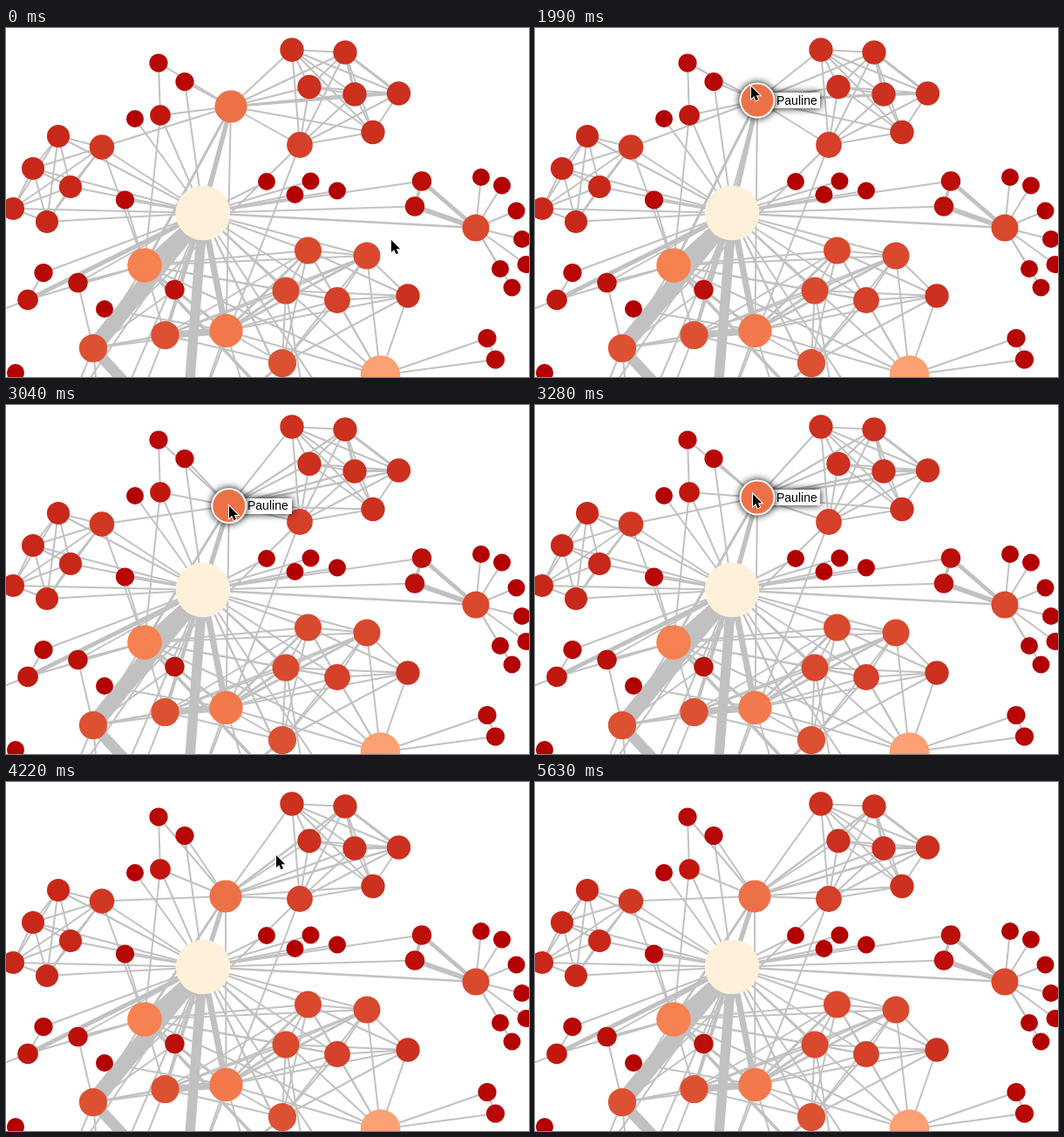
Animation of 600x400 px, one loop 6350 ms. Source, as an HTML page with a canvas:

```html
<!DOCTYPE html>
<html lang="en">
<head>
<meta charset="utf-8">
<title>Network graph</title>
<style>
  html, body { margin: 0; width: 100%; height: 100%; overflow: hidden; background: #fff; }
  canvas { display: block; }
</style>
</head>
<body>
<canvas id="stage" width="600" height="400"></canvas>
<script>
const ctx = document.getElementById('stage').getContext('2d');
const LOOP = 6350, HOVER_START = 1400, HOVER_END = 4220;
const LABEL = 'Pauline', FONT_SIZE = 14;

// Nodes: size and colour follow the degree
const nodes = {}, edges = [];

function mix(a, b, t) {
  return `rgb(${a.map((v, i) => Math.round(v + (b[i] - v) * t))})`;
}

function add(degree, places) {
  const t = (degree - 1) / 17.5;
  const color = t < 1 ? mix([179, 0, 0], [252, 141, 89], t)
                      : mix([252, 141, 89], [254, 240, 217], t - 1);
  for (const [name, [x, y]] of Object.entries(places))
    nodes[name] = { x, y, r: 10 + 0.61 * (degree - 1), color };
}

// Edges: "a b c" lists of node names
function link(center, names, value = 1) {
  for (const name of names.split(' '))
    edges.push([nodes[center], nodes[name], Math.max(2, value * 0.6)]);
}

function clique(names, value) {
  const list = names.split(' ');
  list.slice(0, -1).forEach((name, i) => link(name, list.slice(i + 1).join(' '), value));
}

add(1, {
  leaf1: [299, 176], leaf2: [331.5, 191], leaf3: [349.5, 175.5], leaf4: [380, 186.5],
  leaf5: [148, 104], leaf6: [113, 322], leaf7: [11, 395],
  ray1: [545, 171], ray2: [569, 180.5], ray3: [585.5, 209.5], ray4: [592, 242],
  ray5: [596.5, 271], ray6: [567, 276], ray7: [580.5, 297.5], westOff: [-35, 335]
});
add(2, {
  top: [175, 40], topRight: [205, 61.5], west: [136.5, 197], farWest: [43, 280.5],
  twin1: [552, 355.5], twin2: [561.5, 380]
});
add(3, { east1: [477, 175.5], east2: [469, 204.5], low1: [82.5, 292], low2: [193.5, 300] });
add(4, { topLow: [177, 100], farWest2: [25, 311.5] });
add(6, {
  left1: [60, 124], left2: [31, 161], left3: [74, 182], left4: [47, 222], left5: [8, 207]
});
add(7, {
  up1: [328, 25], up2: [348, 67.5], up3: [421, 119.5],
  up4: [389, 28], up5: [400, 76], up6: [450.5, 75], gang5: [461, 307]
});
add(8, { leftHead: [110, 136.5] });
add(9, { upHead: [337, 134], gang4: [380, 312] });
add(10, { eastHead: [539, 229], gang1: [346.5, 255], gang2: [414, 261], gang3: [321, 301] });
add(11, { cosy: [100, 367], inn: [182.5, 352], girl: [317, 384] });
add(15, { drag: [258, 90] });
add(16, { host: [252.5, 347] });
add(17, { guard: [159, 272] });
add(22, { boy: [429.5, 398] });
add(36, { hub: [226, 212] });
// Below the visible area
add(10, {
  south: [205, 480], southEast: [350, 475], southFar: [410, 490],
  southWest: [110, 480], southWest2: [70, 440], south2: [140, 460], south3: [290, 470]
});

link('hub', 'leaf1 leaf2 leaf3 leaf4 leaf5 west topRight topLow farWest low1 low2 leftHead ' +
  'left1 left2 left3 left4 left5 east1 east2 gang1 gang2 gang3 gang4 boy ' +
  'southFar southWest southWest2');
link('hub', 'eastHead southEast', 4);
link('hub', 'inn', 7);
link('hub', 'farWest2', 8);
link('hub', 'drag', 9);
link('hub', 'host', 12);
link('hub', 'guard', 17);
link('hub', 'south', 19);
link('hub', 'cosy', 31);

link('drag', 'top topRight topLow upHead up1 up2 up3 leftHead inn host');
link('drag', 'up4 up5 up6', 4);
link('drag', 'guard', 5);
link('top', 'topLow');
clique('upHead up1 up2 up3 up4 up5 up6', 3);
clique('up4 up5 up6', 5);
link('upHead', 'cosy south');

clique('leftHead left1 left2 left3 left4 left5', 2);
link('farWest2', 'farWest westOff');
link('guard', 'farWest2 leftHead topLow west low1 low2 cosy inn gang1 gang2 gang3 gang4 boy');
link('guard', 'host', 5);
link('guard', 'southEast', 6);

link('eastHead', 'ray1 ray2 ray3 ray4 ray5 ray6 ray7');
link('eastHead', 'east1', 8);
link('eastHead', 'east2', 10);
link('east1', 'east2', 6);

link('cosy', 'low1 low2 host southWest southWest2');
link('cosy', 'inn', 4);
link('cosy', 'south', 21);
link('inn', 'host', 13);
link('inn', 'gang1 gang2 gang3 girl south2');
link('host', 'leaf6 girl boy south south3 gang4 gang5');
link('host', 'gang1 gang2 gang3', 5);
clique('gang1 gang2 gang3 gang4 gang5 girl', 2);
link('boy', 'gang1 gang2 gang4 gang5 twin1 twin2 south southEast');
link('gang3', 'southEast');
link('girl', 'south', 5);
link('twin1', 'twin2', 3);

// Motion: [time, x, y]; the picture advances in bursts of [start, end, steps]
const bursts = [[110, 700, 6], [820, 1170, 4], [1400, 1750, 4], [1990, 2570, 6], [2690, 3280, 6],
                [3400, 3860, 5], [4220, 4340, 2], [4570, 5160, 6], [5280, 5630, 4]];
const dragPath = [
  [1750, 258, 90], [1990, 255, 83], [2110, 250, 70], [2230, 246, 60], [2350, 243, 55],
  [2450, 242, 58], [2570, 243, 69], [2690, 246, 85], [2810, 251, 103], [2930, 256, 116],
  [3040, 258, 119], [3160, 257, 113], [3280, 255, 106], [3400, 252, 105], [3510, 250, 110],
  [3630, 249, 119], [3750, 250, 127], [3860, 252, 131]
];
const approach = [
  [0, 442, 243], [110, 439, 239], [230, 418, 221], [350, 378, 188], [470, 329, 150],
  [580, 289, 122], [700, 267, 110], [1170, 258, 91], [1400, 257, 88], [1750, 256, 87]
];
const leave = [
  [4220, 310, 84], [4340, 432, 138], [4570, 440, 139], [4810, 470, 146],
  [5040, 555, 255], [5160, 576, 289], [5280, 574, 310], [5515, 556, 375], [5630, 550, 402]
];

function snap(time) {
  let held = 0;
  for (const [start, end, steps] of bursts) {
    if (time < start) break;
    const gap = (end - start) / (steps - 1);
    held = Math.min(end, start + Math.floor((time - start) / gap) * gap);
  }
  return held;
}

function along(path, time) {
  const i = path.findIndex(key => key[0] > time);
  if (i === 0) return path[0].slice(1);
  if (i < 0) return path[path.length - 1].slice(1);
  const [t0, x0, y0] = path[i - 1], [t1, x1, y1] = path[i];
  const k = (time - t0) / (t1 - t0);
  return [x0 + (x1 - x0) * k, y0 + (y1 - y0) * k];
}

function cursorAt(time) {
  if (time < 1750) return along(approach, time);
  if (time >= HOVER_END) return along(leave, time);
  // The dragged node lags behind the pointer
  const [x, y] = along(dragPath, time + 120);
  return [x - 2, y - 3];
}

function disc(x, y, r, color) {
  ctx.fillStyle = color;
  ctx.beginPath();
  ctx.arc(x, y, r, 0, 2 * Math.PI);
  ctx.fill();
}

function drawHover({ x, y, r, color }) {
  ctx.font = `${FONT_SIZE}px "Liberation Sans", Arial, sans-serif`;
  const half = FONT_SIZE / 2 + 2;
  const width = ctx.measureText(LABEL).width + r + 7;
  ctx.save();
  ctx.shadowColor = '#000';
  ctx.shadowBlur = 8;
  ctx.fillStyle = '#fff';
  ctx.fillRect(Math.round(x), Math.round(y - half), Math.round(width), half * 2);
  disc(x, y, r + 2, '#fff');
  ctx.restore();
  disc(x, y, r, color);
  ctx.fillStyle = '#000';
  ctx.fillText(LABEL, Math.round(x + r + 3), Math.round(y + FONT_SIZE / 3));
}

const arrow = new Path2D('M0 0V14L3.2 11L5.5 16.2L8 15.1L5.8 10.2H10.2Z');

function drawCursor(x, y) {
  ctx.save();
  ctx.translate(x, y);
  ctx.lineWidth = 2;
  ctx.strokeStyle = '#fff';
  ctx.stroke(arrow);
  ctx.fillStyle = '#000';
  ctx.fill(arrow);
  ctx.restore();
}

function draw(time) {
  const { drag } = nodes;
  [drag.x, drag.y] = along(dragPath, time);

  ctx.fillStyle = '#fff';
  ctx.fillRect(0, 0, 600, 400);
  ctx.strokeStyle = '#c1c1c1';
  for (const [a, b, width] of edges) {
    ctx.lineWidth = width;
    ctx.beginPath();
    ctx.moveTo(a.x, a.y);
    ctx.lineTo(b.x, b.y);
    ctx.stroke();
  }
  for (const { x, y, r, color } of Object.values(nodes)) disc(x, y, r, color);
  if (time >= HOVER_START && time < HOVER_END) drawHover(drag);
  drawCursor(...cursorAt(time));
}

function frame() {
  draw(snap(performance.now() % LOOP));
  requestAnimationFrame(frame);
}
frame();
</script>
</body>
</html>
```
